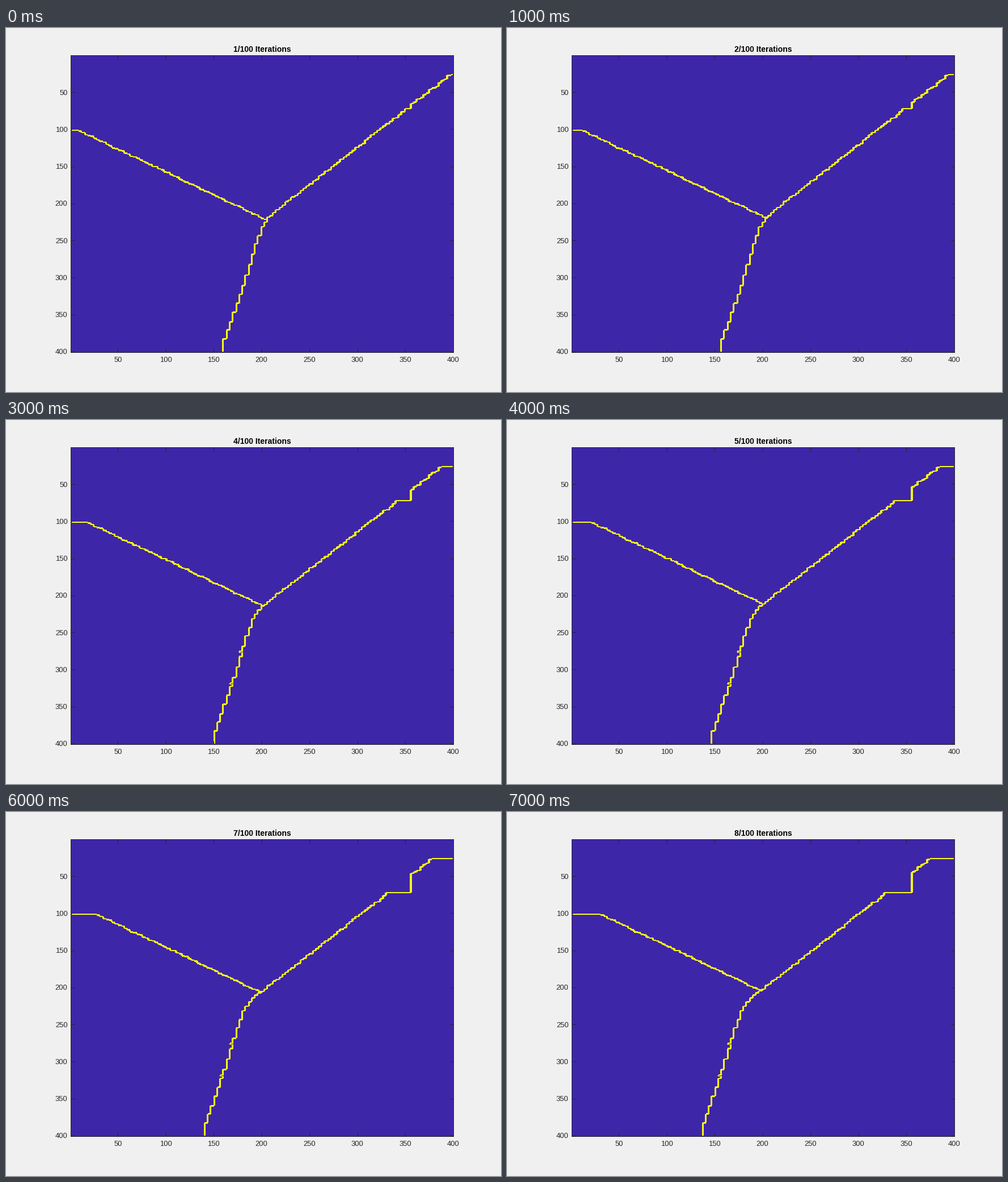
Write a matplotlib script that moves like this. It is 873 px wide and 641 px high and loops after 8000 ms.

```python
import numpy as np
import matplotlib.pyplot as plt
from matplotlib.animation import FuncAnimation
from matplotlib.colors import ListedColormap

W, H, DPI = 873, 641, 100
LEFT, TOP, RIGHT, BOTTOM = 113.6, 48.4, 789.4, 570.6
CELLS = 400
LEFT_TOP, RIGHT_TOP = 180, 82      # rows where the side branches begin
PINNED_X, PINNED_Y = 713.5, 142    # corner that the right branch cannot pass
SPURS = (408, 464)                 # rows where the stem runs a step ahead

cell_w = (RIGHT - LEFT) / CELLS
cell_h = (BOTTOM - TOP) / CELLS
xs = LEFT - 0.5 + (np.arange(CELLS) + 0.5) * cell_w
ys = TOP - 0.5 + (np.arange(CELLS) + 0.5) * cell_h

rng = np.random.default_rng(4)


def slope_rows(start, rise, count=66):
    """Rows of an even, slightly uneven-looking staircase."""
    rows = start + (np.arange(count) + 0.5) * rise
    return np.sort(rows + rng.normal(0, 0.8, count))


left_rows = slope_rows(LEFT_TOP, 2.55)
right_rows = slope_rows(RIGHT_TOP, 4.2)
stem_rows = np.interp(np.arange(19), [0, 3, 6, 8, 12, 16, 18],
                      [314, 327, 349, 380, 453, 516, 547])


def stairs(rows, x0, pitch, k):
    """Edge of a staircase that moves one step sideways per iteration."""
    return x0 + pitch * (np.searchsorted(rows, ys, side="right") + k)


def regions(k):
    left = stairs(left_rows, 127, 5.37, k)
    right = stairs(right_rows, 783, -5.4, k)
    stem = stairs(stem_rows, 487.6, -5.53, k)
    right = np.where(ys < PINNED_Y, np.maximum(right, PINNED_X), right)
    left[ys < LEFT_TOP] = 0
    right[ys < RIGHT_TOP] = W
    if k > 1:
        for y in SPURS:
            stem[np.argmin(abs(ys - y))] -= 5.53
    joined = np.logical_or.accumulate(left >= right)
    left[joined] = right[joined] = stem[joined]
    return (xs >= right[:, None]) * 2 + (xs < left[:, None])


def outline(k):
    a = regions(k)
    edge = np.zeros((CELLS, CELLS), int)
    edge[1:-1, 1:-1] = ((a[1:-1, 2:] != a[1:-1, :-2])
                        | (a[2:, 1:-1] != a[:-2, 1:-1]))
    return edge


def pt(px):
    return px * 72 / DPI


plt.rcParams["font.family"] = "Liberation Sans"
fig = plt.figure(figsize=(W / DPI, H / DPI), dpi=DPI, facecolor="#f0f0f0")
ax = fig.add_axes([LEFT / W, 1 - BOTTOM / H,
                   (RIGHT - LEFT) / W, (BOTTOM - TOP) / H])
image = ax.imshow(outline(0), cmap=ListedColormap(["#3e26a8", "#f9fb15"]),
                  vmin=0, vmax=1, interpolation="nearest", aspect="auto",
                  extent=(0.5, 400.5, 400.5, 0.5))
ticks = range(50, 401, 50)
ax.set_xticks(ticks)
ax.set_yticks(ticks)
ax.tick_params(direction="in", top=True, right=True, length=pt(6.5),
               width=pt(1), color="#262626", labelcolor="#262626",
               labelsize=pt(13))
ax.tick_params(axis="x", pad=pt(8.5))
ax.tick_params(axis="y", pad=pt(5))
for spine in ax.spines.values():
    spine.set(linewidth=pt(1), color="#262626")
title = fig.text(452.3 / W, 1 - 41.5 / H, "", ha="center", va="baseline",
                 weight="bold", size=pt(14), color="black")


def draw(k):
    image.set_data(outline(k))
    title.set_text(f"{k + 1}/100 Iterations")
    return image, title


anim = FuncAnimation(fig, draw, frames=8, interval=1000, repeat=True,
                     repeat_delay=0)
plt.show()
```
